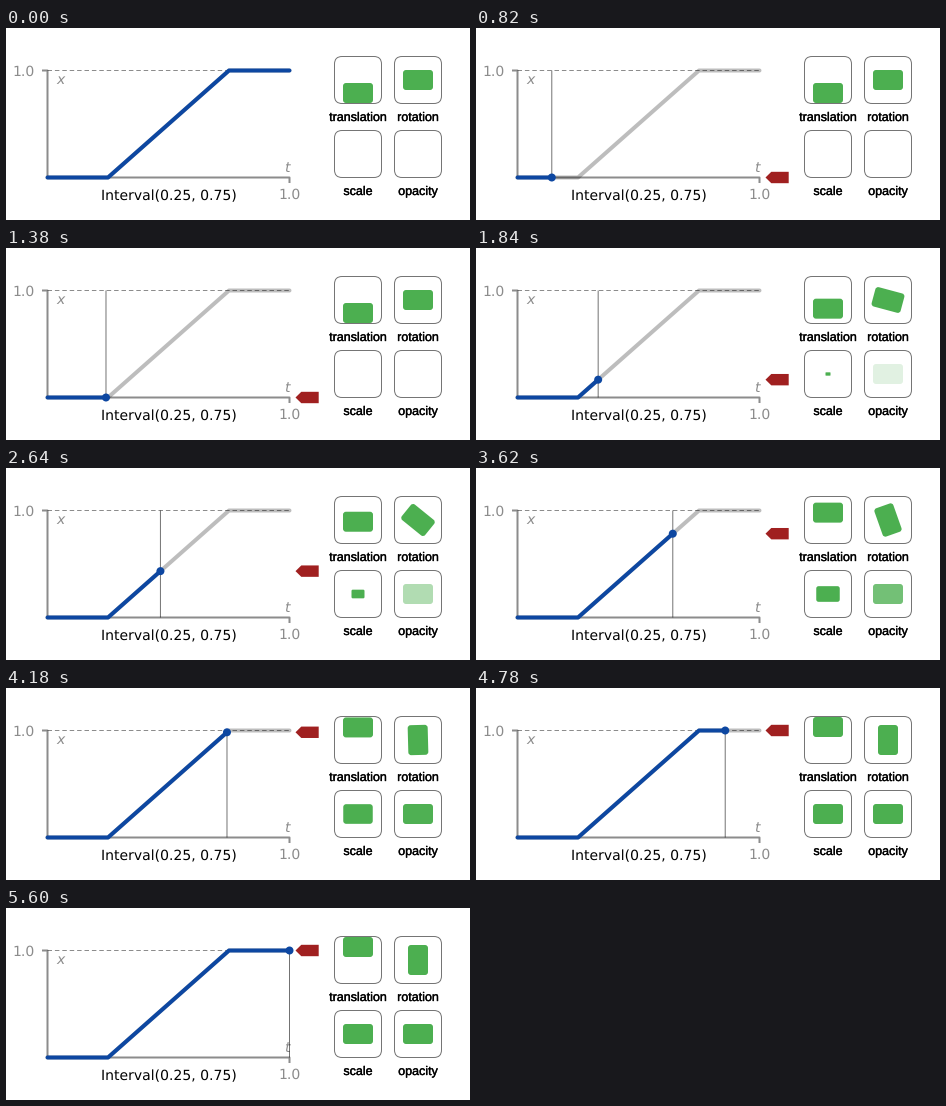
Write a matplotlib script that moves like this. It is 464 px wide and 192 px high and loops after 5620 ms.

```python
import numpy as np
import matplotlib.pyplot as plt
from matplotlib.animation import FuncAnimation
from matplotlib.patches import Circle, FancyBboxPatch, Polygon
from matplotlib.patheffects import withStroke
from matplotlib.transforms import Affine2D

W, H, DPI = 464, 192, 64
PT = 72 / DPI  # points per pixel
STEPS = 120
LEFT, RIGHT, TOP, BOTTOM = 41.5, 283.5, 42.5, 149.5
BEGIN, END = 0.25, 0.75

BLUE, GREEN, RED = "#0D47A1", "#4CAF50", "#A02020"
AXIS = (0, 0, 0, 0.45)
FADED = (0, 0, 0, 0.26)

plt.rcParams["text.hinting"] = "none"
plt.rcParams["path.snap"] = False

fig = plt.figure(figsize=(W / DPI, H / DPI), dpi=DPI, facecolor="white")
ax = fig.add_axes([0, 0, 1, 1])
ax.set_xlim(0, W)
ax.set_ylim(H, 0)
ax.axis("off")


def interval(t):
    return np.clip((t - BEGIN) / (END - BEGIN), 0, 1)


def to_px(t):
    return LEFT + t * (RIGHT - LEFT), BOTTOM - interval(t) * (BOTTOM - TOP)


def stroke(xs, ys, color, width, z, cap="butt", **kw):
    line, = ax.plot(xs, ys, color=color, lw=width * PT, zorder=z,
                    solid_capstyle=cap, solid_joinstyle="round", **kw)
    return line


def label(x, y, text, color="black", size=14, font="DejaVu Sans", **kw):
    return ax.text(x, y, text, color=color, fontsize=size * PT, family=font,
                   ha="center", va="baseline", zorder=3, **kw)


def round_rect(x, y, w, h, r, z, **kw):
    style = f"round,pad=0,rounding_size={r}"
    return ax.add_patch(FancyBboxPatch((x, y), w, h, boxstyle=style,
                                       zorder=z, **kw))


def tile(cx, cy, name):
    """Framed tile with its caption; returns the green block inside."""
    round_rect(cx - 23.5, cy - 23.5, 47, 47, 7.5, 3,
               fc="none", ec="#757575", lw=PT)
    label(cx, cy + 41, name, size=12.5, font="Liberation Sans",
          path_effects=[withStroke(linewidth=0.35 * PT, foreground="black")])
    return round_rect(-15, -10, 30, 20, 3, 2, fc=GREEN, ec="none", lw=0)


def place(block, cx, cy, angle=0, scale=1):
    move = Affine2D().scale(scale).rotate_deg(angle).translate(cx, cy)
    block.set_transform(move + ax.transData)


# Axes, guide and captions
stroke([LEFT - 5.5, LEFT, LEFT, RIGHT, RIGHT],
       [TOP, TOP, BOTTOM, BOTTOM, BOTTOM + 5.5], AXIS, 2, 1)
guide = stroke([LEFT, RIGHT], [TOP, TOP], AXIS, 1, 1)
guide.set_linestyle((0, (4.5, 2.9)))
label(18, 48, "1.0", AXIS)
label(283.5, 171, "1.0", AXIS)
label(54.5, 56, "x", AXIS, style="italic")
label(281, 144, "t", AXIS, style="italic")
label(162.5, 172, "Interval(0.25, 0.75)")

# Curve, cursor and value marker
knots = np.array([0, BEGIN, END, 1])
stroke(*to_px(knots), FADED, 4, 4, "round")
cursor = stroke([], [], (0, 0, 0, 0.55), 1, 3)
trace = stroke([], [], BLUE, 4, 5, "round")
dot = ax.add_patch(Circle((0, 0), 4, fc=BLUE, ec="none", lw=0, zorder=6))
marker = ax.add_patch(Polygon([(0, 0)], fc=RED, ec="none", lw=0, zorder=4))
MARKER = np.array([(289.5, 0), (295.3, -5.7), (312.7, -5.7),
                   (312.7, 5.7), (295.3, 5.7)])

shift = tile(352, 52, "translation")
spin = tile(412, 52, "rotation")
grow = tile(352, 126, "scale")
fade = tile(412, 126, "opacity")
place(fade, 412, 126)


def update(n):
    # Steps are held for 20, 100 and 20 ms in turn.
    cycle, tick = divmod(n, 7)
    t = (3 * cycle + (tick > 0) + (tick > 5)) / STEPS
    v = interval(t)
    x, y = to_px(t)
    active = t > 0

    reach = t if active else 1
    trace.set_data(*to_px(np.append(knots[knots < reach], reach)))
    cursor.set_data([x, x], [TOP, BOTTOM])
    dot.center = x, y
    marker.set_xy(MARKER + (0, y))
    for part in (cursor, dot, marker):
        part.set_visible(active)

    place(shift, 352, 65 - 26 * v)
    place(spin, 412, 52, angle=90 * v)
    place(grow, 352, 126, scale=max(v, 1e-3))
    grow.set_visible(v > 0)
    fade.set_alpha(float(v))
    return trace, cursor, dot, marker, shift, spin, grow, fade


anim = FuncAnimation(fig, update, frames=281, interval=20,
                     repeat=True, repeat_delay=0, blit=False)
plt.show()
```
